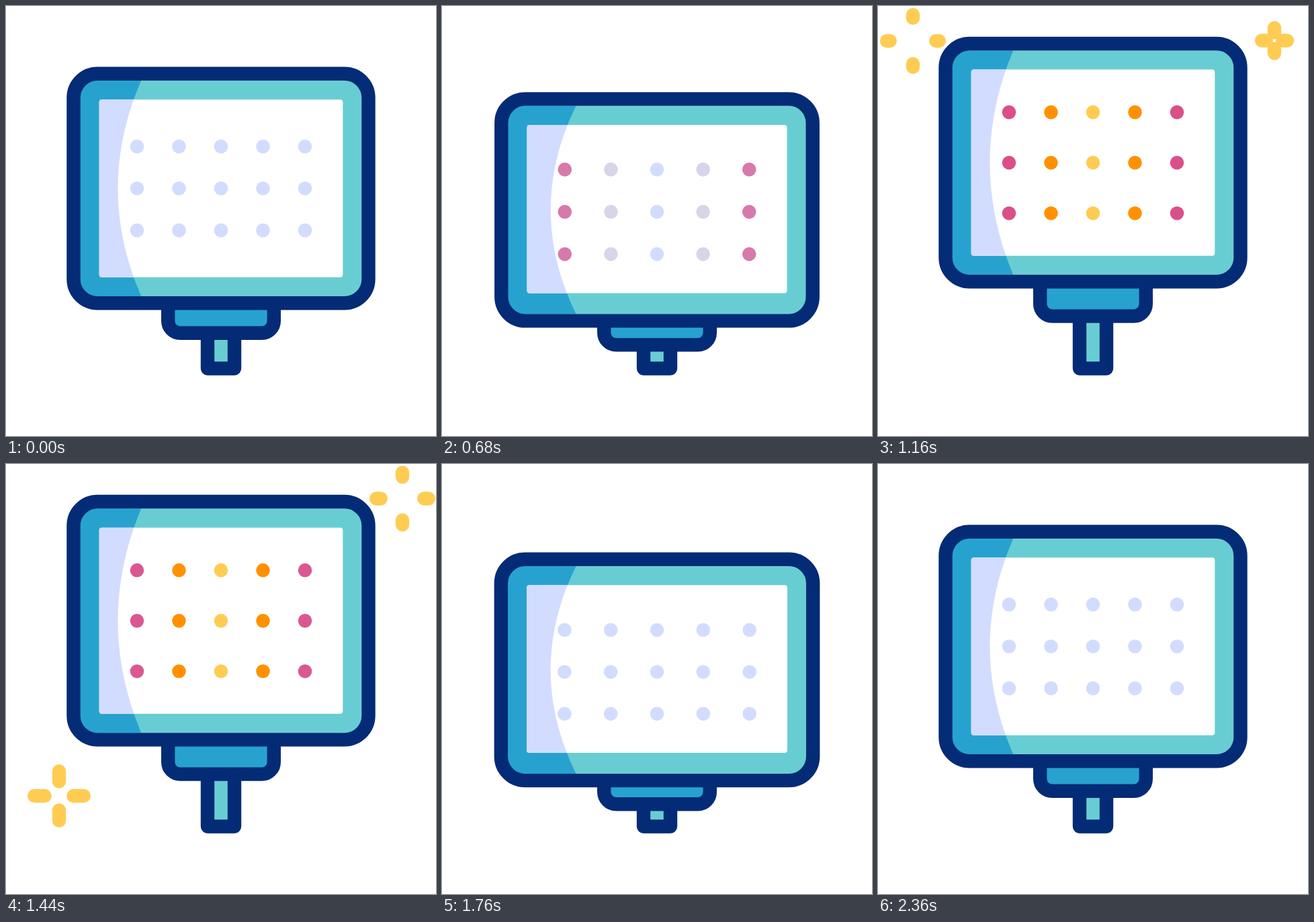
Recreate the animation shown at these times as an HTML page with a canvas. Size 640 by 640 pixels, loop 2.56 s.

```html
<!DOCTYPE html>
<html lang="en">
<head>
<meta charset="utf-8">
<title>Screen</title>
<style>
html, body { margin: 0; width: 100%; height: 100%; overflow: hidden; background: #fff; }
canvas { display: block; width: 100vw; height: 100vh; }
</style>
</head>
<body>
<canvas width="640" height="640"></canvas>
<script>
const ctx = document.querySelector('canvas').getContext('2d');
const LOOP = 2560, STEP = 20, CX = 320, LINE = 20.4;
const NAVY = '#042b75', BLUE = '#27a2cf', TEAL = '#68cdd2', YELLOW = '#ffcc53';
const PALE = [210, 220, 255];
const LIT = [[255, 204, 83], [255, 145, 0], [219, 79, 137]]; // middle column outwards

// Outer edges of the screen, dot rows, foot of the stand, innermost x of the shade
const rest = { half: 229.7, top: 90.5, bottom: 452.5, dotY: 271.5, gapY: 62.4, stand: 497, shade: 166.5 };
const squash = { ...rest, half: 242.5, top: 132, bottom: 481.6, dotY: 309.8, stand: 516.6, shade: 161.5 };
const raised = { ...rest, top: 45.8, bottom: 420.5, dotY: 233.3, gapY: 75.2, stand: 471.8 };
const stretch = { ...rest, half: 223.3, top: 74, bottom: 442, dotY: 260, stand: 491, shade: 176 };

// Each move: start, end, pose reached
const moves = [
  [200, 526, squash], [620, 1089, raised], [1435, 1735, squash],
  [1745, 2040, stretch], [2040, 2360, rest]
];

// start time, centre
const sparkles = [[751, 52, 52], [1058, 590, 51.5], [1185, 79, 494]];

function ease(t, from, to) {
  const u = Math.min(1, Math.max(0, (t - from) / (to - from)));
  return u * u * (3 - 2 * u);
}

const lerp = (a, b, p) => a + (b - a) * p;

function poseAt(t) {
  const pose = { ...rest };
  for (const [from, to, goal] of moves)
    for (const key in pose) pose[key] = lerp(pose[key], goal[key], ease(t, from, to));
  return pose;
}

function box(left, top, right, bottom, radius) {
  ctx.beginPath();
  ctx.roundRect(left, top, right - left, bottom - top, radius);
}

function fill(color) {
  ctx.fillStyle = color;
  ctx.fill();
}

function stroke(color) {
  ctx.strokeStyle = color;
  ctx.lineWidth = LINE;
  ctx.stroke();
}

function drawStand(foot) {
  ctx.lineJoin = 'round';
  ctx.beginPath();
  ctx.rect(300, 430, 40, 109.5);
  fill(TEAL);
  stroke(NAVY);
  box(241.2, 380, 398.8, foot - LINE / 2, 18);
  fill(BLUE);
  stroke(NAVY);
}

function drawScreen({ half, top, bottom, shade }) {
  const widening = half - rest.half;
  const frame = inset => box(CX - half + inset, top + inset, CX + half - inset, bottom - inset, 46 - inset);

  function fillShade(color) {
    const bulge = 34.7 + widening / 4;
    ctx.beginPath();
    ctx.moveTo(0, top + LINE);
    ctx.lineTo(shade + bulge, top + LINE);
    ctx.quadraticCurveTo(shade - bulge, (top + bottom) / 2, shade + bulge, bottom - LINE);
    ctx.lineTo(0, bottom - LINE);
    fill(color);
  }

  ctx.save();
  frame(LINE / 2);
  fill(TEAL);
  ctx.clip();
  fillShade(BLUE);
  box(CX - half + 48.4, top + 48.8, CX + half - 48.4, bottom - 48.8 - widening / 5, 4);
  fill('#fff');
  ctx.clip();
  fillShade(`rgb(${PALE})`);
  ctx.restore();
  frame(LINE / 2);
  stroke(NAVY);
}

function drawDots({ half, dotY, gapY }, t) {
  const gapX = (half - 104.7) / 2;
  for (let col = -2; col <= 2; col++) {
    const ring = Math.abs(col);
    const on = 740 - 100 * ring, off = 1580 - 80 * ring;
    const glow = ease(t, on, on + 220) - ease(t, off, off + 130);
    const color = PALE.map((v, i) => Math.round(lerp(v, LIT[ring][i], glow)));
    for (let row = -1; row <= 1; row++) {
      ctx.beginPath();
      ctx.arc(CX + col * gapX, dotY + row * gapY, 10.3, 0, 7);
      fill(`rgb(${color})`);
    }
  }
}

// Four rays whose outer ends run ahead of the inner ones
function drawSparkle(t, x, y) {
  const inner = lerp(12, 38.8, ease(t, 73, 528));
  const outer = lerp(12, 38.8, ease(t, 0, 307));
  if (outer - inner < 0.1) return;
  ctx.lineCap = 'round';
  ctx.beginPath();
  for (let i = 0; i < 4; i++) {
    const dx = Math.cos(i * Math.PI / 2), dy = Math.sin(i * Math.PI / 2);
    ctx.moveTo(x + dx * inner, y + dy * inner);
    ctx.lineTo(x + dx * outer, y + dy * outer);
  }
  stroke(YELLOW);
}

function draw(t) {
  const pose = poseAt(t);
  ctx.fillStyle = '#fff';
  ctx.fillRect(0, 0, 640, 640);
  drawStand(pose.stand);
  drawScreen(pose);
  drawDots(pose, t);
  for (const [start, x, y] of sparkles) drawSparkle(t - start, x, y);
}

const begin = performance.now();
function tick() {
  const t = (performance.now() - begin) % LOOP;
  draw(Math.floor(t / STEP) * STEP);
  requestAnimationFrame(tick);
}
tick();
</script>
</body>
</html>
```
